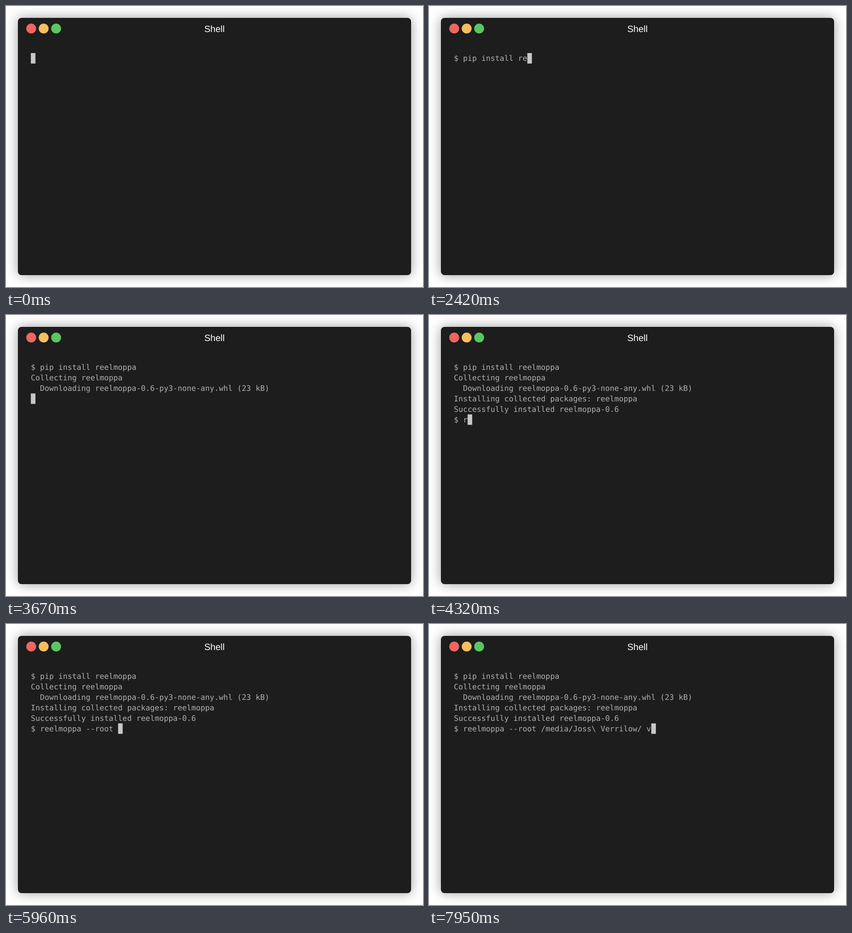
An HTML page for the animation above (8000 ms loop, 910x615 px).

```html
<!DOCTYPE html>
<html lang="en">
<head>
<meta charset="utf-8">
<title>Shell</title>
<style>
  html, body { margin: 0; width: 100%; height: 100%; overflow: hidden; background: #fff; }
  .window {
    position: absolute; left: 26px; top: 26px; width: 858px; height: 563px;
    border-radius: 8px; background: #1d1d1d;
    box-shadow: 0 0 26px rgba(0, 0, 0, .4);
  }
  svg { position: absolute; left: 0; top: 0; display: block; }
  text { white-space: pre; text-rendering: geometricPrecision; }
  .title { font: 20px "Liberation Sans", Arial, sans-serif; fill: #fff; text-anchor: middle; }
  .line { font: 16.64px "DejaVu Sans Mono", monospace; fill: #afafaf; }
</style>
</head>
<body>
<div class="window"></div>
<svg width="910" height="615" viewBox="0 0 910 615">
  <circle cx="55" cy="49.3" r="10.8" fill="#ee665f"/>
  <circle cx="82.2" cy="49.3" r="10.8" fill="#f6be5f"/>
  <circle cx="109.4" cy="49.3" r="10.8" fill="#5ac663"/>
  <text class="title" x="455" y="57">Shell</text>
  <g id="screen"></g>
  <rect id="cursor" width="10.02" height="22.9" fill="#c7c7c7"/>
</svg>
<script>
const LOOP = 8000;
const LEFT = 54.2, TOP = 103, CELL_W = 10.02, CELL_H = 22.9, BASELINE = 17;

// Each step appends text to the terminal at the given time (ms).
const STEPS = [
  [0, ''],
  [760, '$ '],
  [810, 'p'],
  [1000, 'i'],
  [1080, 'p '],
  [1150, 'insta'],
  [1230, 'll '],
  [2420, 're'],
  [2540, 'elm'],
  [2750, 'op'],
  [2820, 'pa'],
  [2880, '\n'],
  [3670, 'Collecting reelmoppa\n  Downloading reelmoppa-0.6-py3-none-any.whl (23 kB)\n'],
  [3760, 'Installing collected packages: reelmoppa\nSuccessfully installed reelmoppa-0.6\n$ '],
  [4320, 'r'],
  [4420, 'ee'],
  [4520, 'l'],
  [4860, 'mo'],
  [4940, 'ppa'],
  [5070, ' --r'],
  [5280, 'oo'],
  [5960, 't '],
  [6320, '/media/'],
  [6380, 'J'],
  [6530, 'oss\\ Verrilow/'],
  [7950, ' v']
];

const screen = document.getElementById('screen');
const cursor = document.getElementById('cursor');

const rows = Array.from({ length: 6 }, (_, i) => {
  const row = document.createElementNS('http://www.w3.org/2000/svg', 'text');
  row.setAttribute('class', 'line');
  row.setAttribute('x', LEFT);
  row.setAttribute('y', TOP + i * CELL_H + BASELINE);
  return screen.appendChild(row);
});

let shown = null;

function draw(time) {
  const output = STEPS.filter(([at]) => at <= time).map(step => step[1]).join('');
  if (output === shown) return;
  shown = output;
  const lines = output.split('\n');
  rows.forEach((row, i) => { row.textContent = lines[i] || ''; });
  const last = lines.length - 1;
  cursor.setAttribute('x', LEFT + lines[last].length * CELL_W);
  cursor.setAttribute('y', TOP + last * CELL_H);
}

const start = performance.now();

function tick() {
  draw((performance.now() - start) % LOOP);
  requestAnimationFrame(tick);
}

tick();
</script>
</body>
</html>
```
